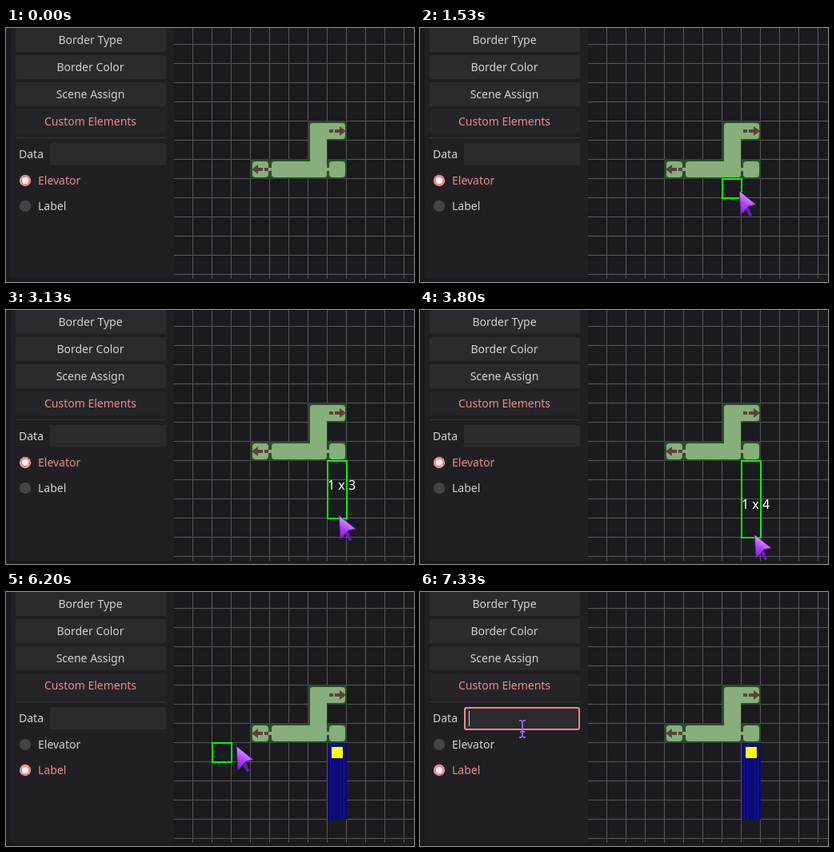
Animation, 510 px wide and 318 px high, one loop 8 s. Source, as an HTML page with a canvas:

```html
<!DOCTYPE html>
<html lang="en">
<head>
<meta charset="utf-8">
<title>Map editor</title>
<style>
html, body { margin: 0; width: 100%; height: 100%; overflow: hidden; background: #1b1a1f; }
canvas { display: block; }
</style>
</head>
<body>
<canvas id="stage" width="510" height="318"></canvas>
<script>
const ctx = document.getElementById('stage').getContext('2d');
const LOOP = 8000, STEP = 200 / 3, CELL = 24, X0 = 18, Y0 = 21;
const PINK = '#ee8a8a', TEXT = '#d2d2d4', WHITE = '#ffffff';

// Moments of action, counted in steps
const DRAG = 45, DROP = 60, PICK_LABEL = 85, FOCUS = 110;

// Pointer paths: step, x, y
const toElevator = [[5, 84, 316], [17, 60, 190], [18, 60, 190], [20, 14, 192]];
const toGrid = [
  [21, 130, 196], [22, 385, 202], [23, 399, 204], [28, 422, 188],
  [31, 416, 181], [35, 416, 181], [38, 416, 198], [44, 416, 198]
];
const dragging = [
  [45, 416, 201], [46, 416, 240], [47, 416, 257], [49, 418, 294],
  [54, 418, 294], [56, 418, 283], [57, 418, 281], [59, 418, 281]
];
const leaving = [[62, 471, 181], [69, 471, 181], [71, 240, 214], [73, 46, 215], [74, -40, 215]];
const toLabel = [[81, -40, 215], [82, 12, 222], [86, 22, 223]];
const toField = [
  [91, 240, 184], [92, 272, 195], [93, 288, 193], [95, 330, 176],
  [98, 431, 130], [103, 250, 213], [107, 80, 178], [109, 127, 171], [110, 128, 171]
];
const path = [...toElevator, ...toGrid, ...dragging, ...leaving, ...toLabel, ...toField];

function pointer(step) {
  if (step < path[0][0]) return [-99, -99];
  const i = path.findIndex(p => p[0] > step);
  if (i < 0) return path[path.length - 1].slice(1);
  const [a, ax, ay] = path[i - 1], [b, bx, by] = path[i];
  const k = (step - a) / (b - a);
  return [Math.round(ax + (bx - ax) * k), Math.round(ay + (by - ay) * k)];
}

function box(color, x, y, w, h, r = 0) {
  ctx.fillStyle = color;
  ctx.beginPath();
  ctx.roundRect(x, y, w, h, r);
  ctx.fill();
}

function poly(color, ...pts) {
  ctx.fillStyle = color;
  ctx.beginPath();
  for (let i = 0; i < pts.length; i += 2) ctx.lineTo(pts[i], pts[i + 1]);
  ctx.closePath();
  ctx.fill();
}

function disc(color, x, y, r) {
  ctx.fillStyle = color;
  ctx.beginPath();
  ctx.arc(x, y, r, 0, 7);
  ctx.fill();
}

function write(str, x, y, color = TEXT, align = 'left', size = 14) {
  ctx.font = size + 'px "Noto Sans", sans-serif';
  ctx.textAlign = align;
  ctx.fillStyle = color;
  ctx.fillText(str, x, y);
}

function grid() {
  box('#1b1a1f', 0, 0, 510, 318);
  for (let x = 233; x < 510; x += CELL) box('#58575b', x, 0, 1, 314);
  for (let y = 20; y < 314; y += CELL) box('#58575b', 210, y, 300, 1);
}

// Dashed arrow, tip at x, y; dir is 1 for right, -1 for left
function arrow(x, y, dir) {
  ctx.save();
  ctx.translate(x, y);
  ctx.scale(dir, 1);
  box('#613f3a', -21, -2, 5, 4);
  box('#613f3a', -14, -2, 7, 4);
  poly('#613f3a', -8, -6, 0, 0, -8, 6);
  ctx.restore();
}

function rooms() {
  const edge = '#2d4a2c', fill = '#86af7b';
  box(edge, 305, 164, 121, 25);
  box(edge, 377, 116, 49, 25);
  box(edge, 377, 116, 25, 73);
  box(fill, 308, 167, 20, 20, 4);
  box(fill, 332, 167, 69, 20, 4);
  box(fill, 404, 167, 20, 20, 4);
  box(fill, 380, 119, 44, 20, 4);
  box(fill, 380, 119, 21, 68, 4);
  box(fill, 327, 175, 6, 4);
  box(fill, 400, 175, 5, 4);
  arrow(425, 129, 1);
  arrow(307, 177, -1);
}

function elevator(bright) {
  box(bright ? '#1717cf' : '#0b0b79', 402, 189, 24, 96);
  for (const x of [405, 409, 418, 422]) box(bright ? '#2626df' : '#17178d', x, 189, 1, 96);
  box('#ffff00', 407, 194, 14, 14);
}

function radio(label, y, on, mx, my) {
  const hover = mx >= 12 && mx < 200 && Math.abs(my - y) < 16;
  disc(on ? PINK : '#444348', 24, y, 7.2);
  if (on) disc(WHITE, 24, y, 4);
  write(label, 40, y + 5, hover ? WHITE : on ? PINK : TEXT);
}

function panel(step, mx, my) {
  box('#201f24', 6, 0, 204, 314);
  ['Border Type', 'Border Color', 'Scene Assign', 'Custom Elements'].forEach((name, i) => {
    const on = i === 3;
    box(on ? '#252429' : '#2b2a2f', 12, 34 * i, 188, 30, 2);
    write(name, 105.5, 20 + 34 * i, on ? PINK : TEXT, 'center');
  });
  box('#39383d', 12, 137, 188, 1);
  write('Data', 16, 163);
  box('#2b2a2f', 55, 144, 145, 28, 2);
  if (step >= FOCUS) {
    ctx.strokeStyle = PINK;
    ctx.lineWidth = 2;
    ctx.beginPath();
    ctx.roundRect(56, 145, 143, 27, 2);
    ctx.stroke();
    box(TEXT, 61, 149, 1, 19);
  }
  const labelOn = step >= PICK_LABEL;
  radio('Elevator', 191, !labelOn, mx, my);
  radio('Label', 223, labelOn, mx, my);
}

function frame(x, y, rows = 1) {
  ctx.strokeStyle = '#00ff00';
  ctx.lineWidth = 2;
  ctx.strokeRect(x, y, CELL, CELL * rows);
}

// The outline trails the pointer by one step
function selection(step) {
  const [x, y] = pointer(step - 1);
  if (step >= DRAG && step < DROP) {
    const rows = Math.max(1, Math.floor((y - 189) / CELL) + 1);
    frame(402, 189, rows);
    write('1 x ' + rows, 402, 153 + CELL * rows, WHITE, 'left', 16);
  } else if (x > 210 && pointer(step)[0] > 210) {
    const snap = (v, o) => Math.floor((v - o) / CELL) * CELL + o;
    frame(snap(x, X0), snap(y, Y0));
  }
}

function cursor(x, y) {
  ctx.save();
  ctx.translate(x, y);
  if (x >= 55 && x < 200 && y >= 144 && y <= 173) {
    const c = '#9a62d0';
    box(c, -1, -10, 2, 21);
    for (const end of [-11, 10]) {
      box(c, -4, end, 3, 2);
      box(c, 1, end, 3, 2);
    }
    box(c, -3, 3, 6, 2);
  } else {
    poly('#7414cf', 6, 20, 11, 18, 16, 31, 13, 32);
    const shade = ctx.createLinearGradient(12, 8, 2, 27);
    shade.addColorStop(0, '#d88cff');
    shade.addColorStop(0.45, '#b044ff');
    shade.addColorStop(1, '#8a1eea');
    poly(shade, 0, 0, 21, 17, 12, 19, 2, 30);
    ctx.strokeStyle = '#54208a';
    ctx.lineWidth = 1;
    ctx.stroke();
  }
  ctx.restore();
}

function draw(now) {
  const step = Math.floor((now % LOOP + 4) / STEP);
  const [mx, my] = pointer(step);
  grid();
  rooms();
  if (step >= DROP) elevator(step < PICK_LABEL);
  selection(step);
  panel(step, mx, my);
  cursor(mx, my);
  requestAnimationFrame(draw);
}
requestAnimationFrame(draw);
</script>
</body>
</html>
```
